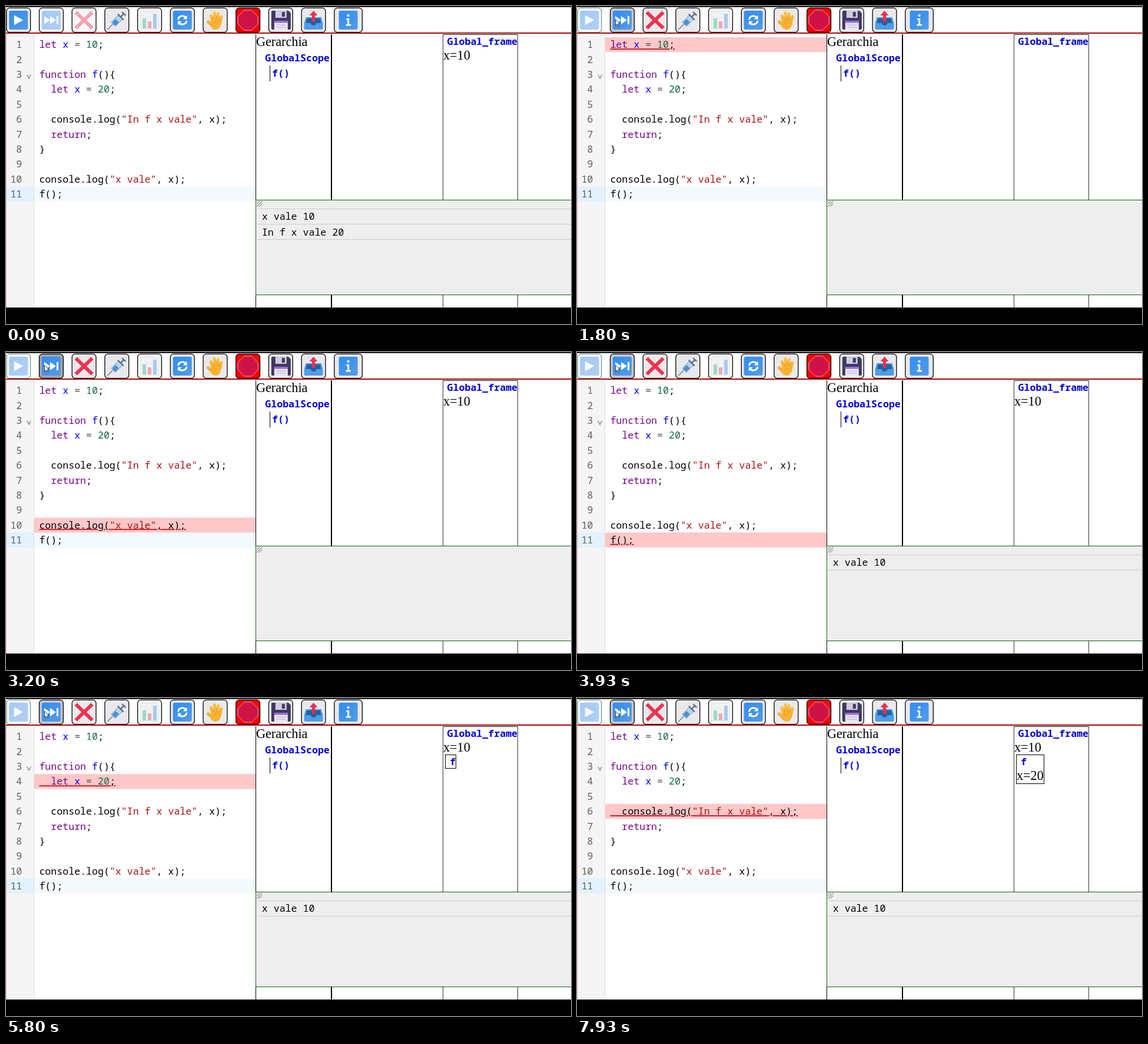
Recreate the animation shown at these times as an HTML page. Size 960x540 px, loop 8000 ms.

```html
<!DOCTYPE html>
<html lang="it">
<head>
<meta charset="utf-8">
<style>
html, body { margin: 0; width: 100%; height: 100%; overflow: hidden; background: #000; }
svg { display: block; width: 960px; height: 540px; }
text { white-space: pre; }
.mono { font: 16.6px "Noto Sans Mono", monospace; }
.bold { font-weight: 700; fill: #0000d8; }
.serif { font: 22.2px "Liberation Serif", "Times New Roman", serif; }
.num { fill: #5e5e5e; text-anchor: end; }
.active { fill: #c00010; text-decoration: underline; }
.k { fill: #770088; } .d { fill: #0000ff; } .n { fill: #116644; }
.s { fill: #aa1111; } .o { fill: #4a4a4a; } .p { fill: #000; }
</style>
</head>
<body>
<svg id="stage" viewBox="0 0 960 540">
  <defs>
    <linearGradient id="blue" x1="0" y1="0" x2="1" y2="1">
      <stop offset="0" stop-color="#2f8df2"/><stop offset="1" stop-color="#559be6"/>
    </linearGradient>
    <linearGradient id="skin" x1="0" y1="0" x2="0" y2="1">
      <stop offset="0" stop-color="#ffc33d"/><stop offset="1" stop-color="#f5a52c"/>
    </linearGradient>
  </defs>
  <rect width="960" height="512" fill="#fff"/>
  <rect width="960" height="2" fill="#1f1c24"/>
  <g id="toolbar"></g>

  <g id="editor">
    <rect x="0" y="48" width="47" height="464" fill="#f5f5f5"/>
    <path d="M47.5 48V512" stroke="#ddd"/>
    <path d="M.5 48V512" stroke="#ffb4b4"/>
    <rect x="1" y="306.5" width="46" height="25.4" fill="#e2f2ff"/>
    <rect x="48" y="306.5" width="376" height="25.4" fill="#f2fafe"/>
    <rect id="mark" x="48" width="376" height="25.4" fill="#ffc8c8"/>
    <path d="M35.8 116.8L39 123L42.2 116.8" fill="none" stroke="#777" stroke-width="1.2"/>
    <g id="code" class="mono"></g>
  </g>

  <g id="panels" stroke="#000">
    <path d="M424.5 48V512M448.5 101V128M742 48.5H870"/>
    <path d="M742.5 48V512M869.5 48V512" stroke="#333"/>
    <path d="M553 48V512" stroke-width="2"/>
  </g>
  <path d="M0 46H960" stroke="#a00808" stroke-width="2"/>
  <text class="serif" x="425" y="68">Gerarchia</text>
  <g class="mono bold">
    <text x="440.3" y="93.5">GlobalScope</text>
    <text x="452" y="120.3">f()</text>
    <text x="749.6" y="66.3">Global_frame</text>
  </g>
  <text id="globalX" class="serif" x="743" y="91">x=10</text>
  <g id="call">
    <rect id="callBox" x="746.5" y="96.5" fill="none" stroke="#000"/>
    <text class="mono bold" x="754" y="114.2">f</text>
    <text id="localX" class="serif" x="747" y="139">x=20</text>
  </g>

  <g id="console">
    <rect x="424.5" y="329.5" width="540" height="161" fill="#eee" stroke="#0c640c"/>
    <path d="M426 340.5L435.5 331M426 336L431 331M429.5 341L435 335.5" stroke="#555"/>
    <g id="out1">
      <path d="M427 344.5H960M427 370.5H960" stroke="#ccc"/>
      <text class="mono" x="434.8" y="363">x vale 10</text>
    </g>
    <g id="out2">
      <path d="M427 370.5H960M427 396.5H960" stroke="#ccc"/>
      <text class="mono" x="434.8" y="389.7">In f x vale 20</text>
    </g>
  </g>
  <path id="cursor" d="M0 0V10.5L2.5 8.3L4.1 12L5.9 11.2L4.3 7.6H7.6Z" fill="#fff" stroke="#111" stroke-width=".8"/>
</svg>
<script>
const LOOP = 8000, ROW = 25.35;
const START = 1330, CLICKS = [2200, 3330, 4330, 5200, 6130], LINES = [1, 10, 11, 3, 4, 6];
const PRESS = 200;
const $ = id => document.getElementById(id);
const show = (id, on) => $(id).setAttribute("visibility", on ? "visible" : "hidden");

// Toolbar icons share a 32 x 32 box.
const tile = '<rect width="32" height="32" rx="3" fill="url(#blue)"/>';
const icons = {
  play: tile + '<path d="M8.5 7.5V24.5L24 16Z" fill="#fff"/>',
  step: tile + '<path d="M4 9V23L14 16ZM14 9V23L24 16ZM25 9H28V23H25Z" fill="#fff"/>',
  close: '<path d="M2 2.5L30 29.5M30 2.5L2 29.5" stroke="#f0324f" stroke-width="6"/>',
  syringe: `<path d="M0 32L9 23" stroke="#7d8797" stroke-width="1.5"/>
    <path d="M6.5 19.5L19 7L26 14L13.5 26.5Z" fill="#b3d5ee" stroke="#7495b5"/>
    <path d="M8 20L14 14L19.5 19.5L13.5 25.5Z" fill="#4a8fd8"/>
    <path d="M17.5 5.5L27.5 15.5M22.5 10.5L28 5M25 2L31 8" stroke="#5c7086" stroke-width="2.4"/>`,
  chart: `<rect x=".5" y=".5" width="31" height="31" rx="3" fill="#eef0f5" stroke="#c8ccd6"/>
    <path d="M.5 11H31.5M.5 21H31.5M11 .5V31.5M21 .5V31.5" stroke="#d5d8e0"/>
    <path d="M4 13H10V30H4Z" fill="#22b573"/><path d="M13 18H19V30H13Z" fill="#e93a62"/>
    <path d="M22 5H28V30H22Z" fill="#3c8ee8"/>`,
  reload: tile + `<g transform="translate(3.2 3.2) scale(.8)">
    <path d="M7 15A9 9 0 0 1 23 10.5M25 17A9 9 0 0 1 9 21.5" fill="none" stroke="#fff" stroke-width="3.6"/>
    <path d="M25.8 5.5V14H17.5ZM6.2 26.5V18H14.5Z" fill="#fff"/></g>`,
  hand: `<g fill="none" stroke="url(#skin)" stroke-width="5" stroke-linecap="round">
    <path d="M9 8.5L12 20M14.8 3.5L16 18M21 5L20 18M26.5 10L24 21M4 18.5L11 25"/></g>
    <path d="M9.5 16H26.3L25.5 24Q23.5 32 17 32Q11 32 7.5 26Z" fill="#f9b233"/>
    <path d="M12.4 10L13.7 16M18 8V16M23.4 10L22.7 16M12 23Q15 19 20 20" fill="none" stroke="#e48b23" stroke-width=".8"/>`,
  stop: '<path d="M9.8-1H22.2L33 9.8V22.2L22.2 33H9.8L-1 22.2V9.8Z" fill="#cf1245" stroke="#eeb4c2" stroke-width=".9"/>',
  save: `<path d="M0 2Q0 0 2 0H29L33 4V30Q33 32 31 32H2Q0 32 0 30Z" fill="#3f3860"/>
    <path d="M7 0H26V12H7Z" fill="#cfcde0"/><path d="M18 2H23V10H18Z" fill="#3f3860"/>
    <path d="M5 17H28V32H5Z" fill="#eae5f6"/><path d="M5 17H28V20.5H5Z" fill="#9a66dc"/>
    <path d="M8 24H25M8 28H25" stroke="#b4afc6"/>`,
  upload: `<path d="M3 11H29L32 21V30Q32 32 30 32H2Q0 32 0 30V21Z" fill="#4d9de8"/>
    <path d="M5 13H27L29 21H21Q20 25 16 25Q12 25 11 21H3Z" fill="#245f9f"/>
    <path d="M16 0L23 8H18.7V19H13.3V8H9Z" fill="#ec304f"/>`,
  info: tile + '<circle cx="16" cy="8" r="2.2" fill="#fff"/><path d="M12.5 13H17.6V23H20.5V25.5H12V23H14.6V15.5H12.5Z" fill="#fff"/>'
};

$("toolbar").innerHTML = Object.keys(icons).map((name, i) => {
  const x = .8 + i * 55.7, w = name === "info" ? 47.5 : 40.8;
  return `<g id="${name}" transform="translate(${x} 3.3)">
    <rect width="${w}" height="41.4" rx="5.5" fill="${name === "stop" ? "#f00" : "#e9e9ed"}" stroke="#000" stroke-width="1.3"/>
    <g transform="translate(${(w - 32) / 2} 4.8)">${icons[name]}</g></g>`;
}).join("");

// Each part is a style letter, a colon and its text; parts are split by "|".
const program = [
  "k:let|p: |d:x|p: |o:=|p: |n:10|p:;", "",
  "k:function|p: |d:f|p:(){",
  "p:  |k:let|p: |d:x|p: |o:=|p: |n:20|p:;", "",
  'p:  console.log(|s:"In f x vale"|p:, x);',
  "p:  |k:return|p:;", "p:}", "",
  'p:console.log(|s:"x vale"|p:, x);', "p:f();"
];
$("code").innerHTML = program.map((line, i) => {
  const y = 71.4 + i * ROW;
  const parts = line && line.split("|").map(p => `<tspan class="${p[0]}">${p.slice(2)}</tspan>`).join("");
  return `<text class="num" x="27.3" y="${y}">${i + 1}</text><text id="line${i + 1}" x="56.4" y="${y}">${parts}</text>`;
}).join("");

function setButton(name, enabled, fill, stroke = "#000") {
  const [box, icon] = $(name).children;
  box.setAttribute("fill", enabled ? fill : "#f6f6f8");
  box.setAttribute("stroke", stroke);
  icon.setAttribute("opacity", enabled ? 1 : .42);
}

function render(t) {
  const running = t >= START;
  const done = CLICKS.filter(c => t >= c).length;
  const line = running ? LINES[done] : 0;
  const pressed = c => t >= c - PRESS && t < c;
  const move = Math.min(1, Math.max(0, (t - 1400) / 300));
  const ease = move * move * (3 - 2 * move);

  setButton("play", !running, pressed(START) ? "#b1b1b9" : t >= 1000 ? "#d0d0d7" : "#e9e9ed", running ? "#78a088" : "#000");
  setButton("step", running, CLICKS.some(pressed) ? "#a4a4ac" : ease > .7 ? "#c6c6ce" : "#e9e9ed");
  setButton("close", running, "#e9e9ed");
  setButton("chart", false);

  show("mark", running);
  $("mark").setAttribute("y", 53 + (line - 1) * ROW);
  program.forEach((_, i) => $("line" + (i + 1)).classList.toggle("active", line === i + 1));

  show("globalX", !running || done >= 1);
  show("out1", !running || done >= 2);
  show("out2", !running);
  show("call", done >= 3);
  show("localX", done >= 5);
  $("callBox").setAttribute("width", done >= 5 ? 47 : 18);
  $("callBox").setAttribute("height", done >= 5 ? 49 : 23);

  show("cursor", t >= 1000);
  $("cursor").setAttribute("transform", `translate(${24 + 41.5 * ease} ${25 - 2.5 * ease})`);
}

const begin = performance.now();
function tick() {
  render((performance.now() - begin) % LOOP);
  requestAnimationFrame(tick);
}
tick();
</script>
</body>
</html>
```
